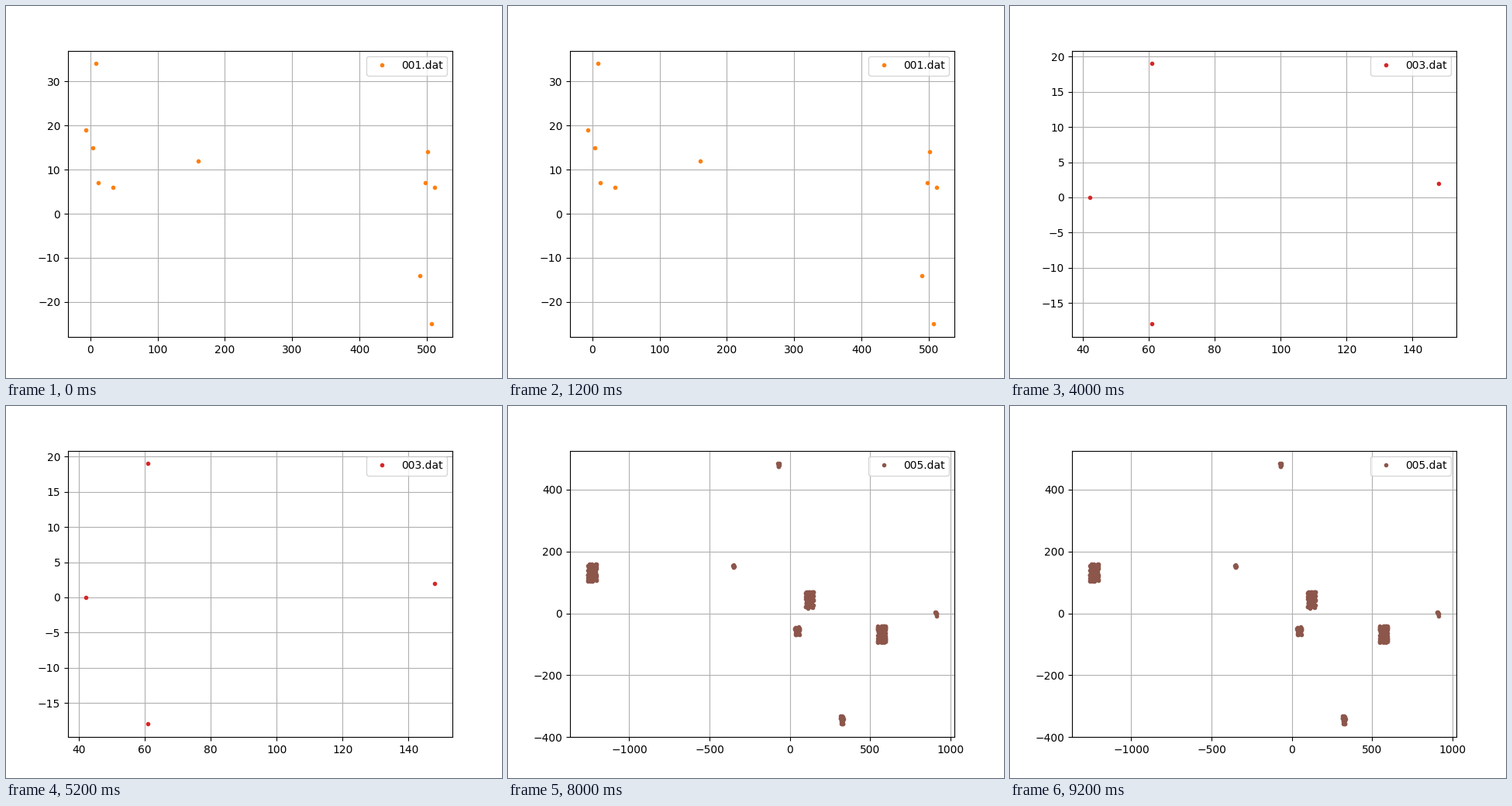
A matplotlib script that plays this animation: 640 by 480 pixels, repeating every 10000 ms.

```python
import numpy as np
import matplotlib.pyplot as plt
from matplotlib.animation import FuncAnimation

rng = np.random.default_rng(4)


def scatter(x0, x1, y0, y1, n):
    """n random whole-number points that reach all four sides of a box."""
    u = rng.random((n, 2))
    u = (u - u.min(axis=0)) / np.ptp(u, axis=0)
    return np.round((x0, y0) + u * (x1 - x0, y1 - y0))


def island(x0, x1, y0, y1):
    """A dense group whose point count follows its area."""
    return scatter(x0, x1, y0, y1, 3 + (x1 - x0) * (y1 - y0) // 25)


kite = [(42, 0), (61, 19), (61, -18)]
pairs = [(8, 34), (-7, 19), (4, 15), (12, 7), (34, 6), (160, 12),
         (501, 14), (498, 7), (512, 6), (490, -14), (507, -25)]
islands = [(-1260, -1205, 105, 158), (97, 146, 17, 70), (31, 60, -70, -43),
           (544, 596, -94, -40), (314, 332, -358, -333),
           (-75, -65, 474, 484), (-354, -345, 150, 156), (905, 915, -8, 4)]

# (points, legend corner) for each plot
plots = [
    (np.array(pairs), "upper right"),
    (np.array(kite + [(80, 0)]), "upper right"),
    (np.array(kite + [(148, 2)]), "upper right"),
    (scatter(-110, 109, -55, 54, 900), "lower right"),
    (np.vstack([island(*b) for b in islands]), "upper right"),
]

fig, ax = plt.subplots(figsize=(6.4, 4.8), dpi=100)


def draw(i):
    points, corner = plots[i]
    ax.clear()
    ax.plot(*points.T, ".", color=f"C{i + 1}", label=f"{i + 1:03d}.dat")
    ax.grid(True)
    ax.legend(loc=corner)


anim = FuncAnimation(fig, draw, frames=len(plots), interval=2000,
                     init_func=lambda: None, repeat=True, repeat_delay=0)
plt.show()
```
